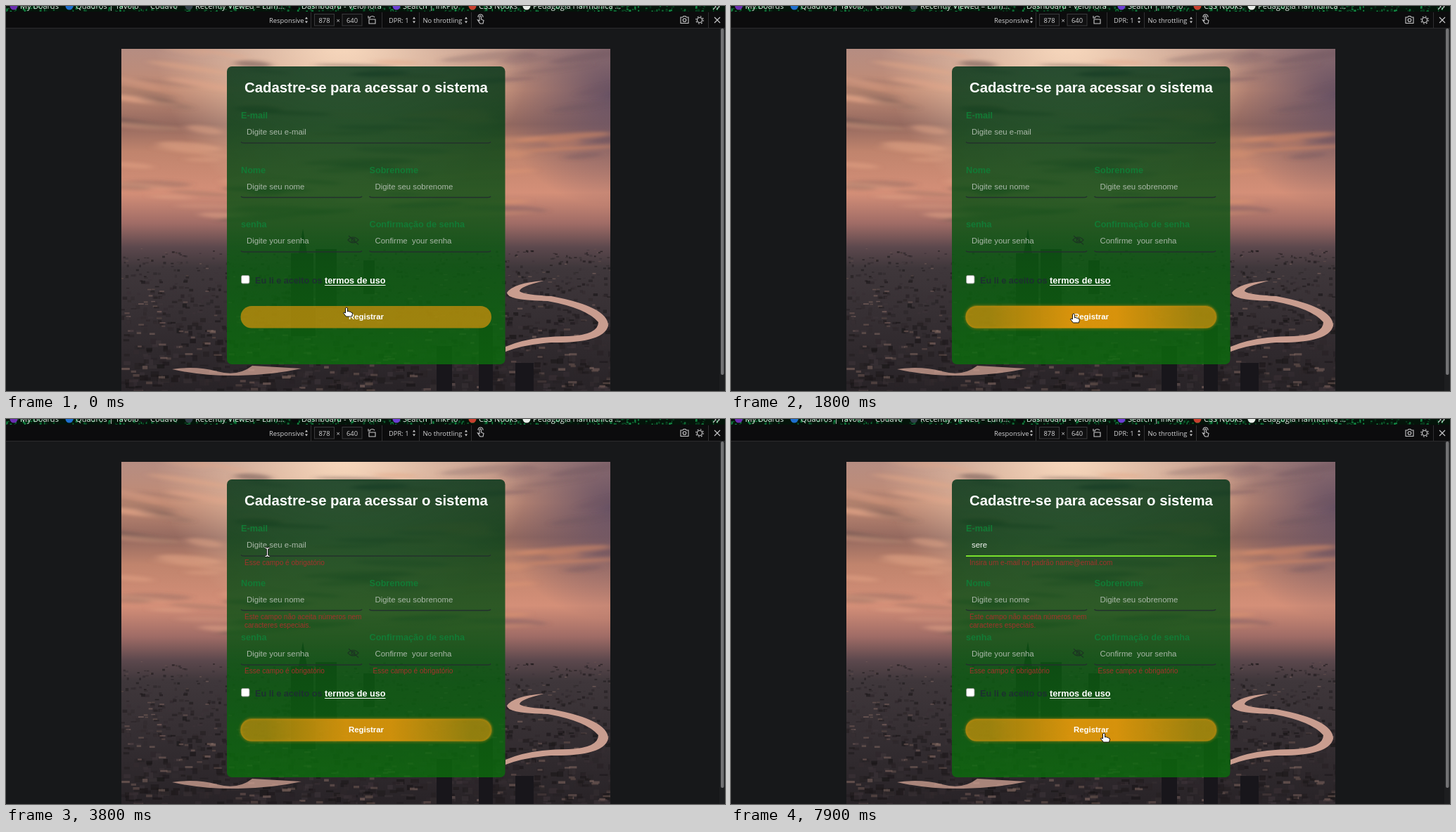
Write an HTML page that moves like this. It is 1022 px wide and 548 px high and loops after 8 s.

```html
<!DOCTYPE html>
<html lang="pt-BR">
<head>
<meta charset="utf-8">
<title>Cadastro</title>
<style>
html, body { margin: 0; width: 100%; height: 100%; overflow: hidden; background: #17181a; }
svg { display: block; width: 100%; height: 100%; }
text { font-family: "Liberation Sans", Arial, sans-serif; white-space: pre; }
.ui { font-family: "Open Sans", "Noto Sans", sans-serif; }
.label { font-weight: 700; font-size: 12.65px; fill: #127a35; }
.hint { font-size: 11.4px; fill: #a9b8a8; }
.err { font-size: 10.06px; fill: #a3322c; }
.line { fill: none; stroke: #23302d; stroke-width: 1.4; }
.icon { fill: none; stroke: #c9c9cb; stroke-width: 1.1; }
</style>
</head>
<body>
<svg viewBox="0 0 1022 548">
  <defs>
    <linearGradient id="sky" x2="0" y2="1">
      <stop offset="0" stop-color="#b58d82"/>
      <stop offset=".12" stop-color="#c28b74"/>
      <stop offset=".22" stop-color="#94695f"/>
      <stop offset=".3" stop-color="#c0846d"/>
      <stop offset=".42" stop-color="#d48f78"/>
      <stop offset=".51" stop-color="#a06c66"/>
      <stop offset=".58" stop-color="#5c484d"/>
      <stop offset=".64" stop-color="#3f373b"/>
      <stop offset="1" stop-color="#282327"/>
    </linearGradient>
    <radialGradient id="sun" gradientUnits="userSpaceOnUse" cx="480" cy="40" r="270">
      <stop offset="0" stop-color="#fbdcc0"/><stop offset="1" stop-color="#fbdcc0" stop-opacity="0"/>
    </radialGradient>
    <radialGradient id="dusk" gradientUnits="userSpaceOnUse" cx="860" cy="125" r="160">
      <stop offset="0" stop-color="#685264"/><stop offset="1" stop-color="#685264" stop-opacity="0"/>
    </radialGradient>
    <linearGradient id="glass" x2="0" y2="1">
      <stop offset="0" stop-color="#003216"/>
      <stop offset=".5" stop-color="#0c5214"/>
      <stop offset="1" stop-color="#0c6c0d"/>
    </linearGradient>
    <linearGradient id="fill">
      <stop class="edge" offset=".1" stop-color="#f29a0a"/>
      <stop class="mid" offset=".42" stop-color="#f29a0a"/>
      <stop class="mid" offset=".6" stop-color="#f29a0a"/>
      <stop class="edge" offset=".92" stop-color="#f29a0a"/>
    </linearGradient>
    <filter id="soft" x="-10%" y="-10%" width="120%" height="120%"><feGaussianBlur stdDeviation="6 2"/></filter>
    <filter id="glow" x="-10%" y="-60%" width="120%" height="220%"><feGaussianBlur stdDeviation="1.6"/></filter>
    <clipPath id="frame"><rect x="164" y="61" width="695" height="487"/></clipPath>
    <clipPath id="strip"><rect width="1022" height="8"/></clipPath>
  </defs>

  <rect width="1022" height="548" fill="#17181a"/>
  <g id="tabs" clip-path="url(#strip)"></g>
  <g id="tools"></g>

  <g clip-path="url(#frame)">
    <rect x="164" y="61" width="695" height="487" fill="url(#sky)"/>
    <rect x="164" y="61" width="695" height="280" fill="url(#sun)"/>
    <rect x="164" y="61" width="695" height="280" fill="url(#dusk)"/>
    <g id="clouds" filter="url(#soft)"></g>
    <g id="city"></g>
    <g fill="#c99d8f">
      <path d="M712 408Q722 394 765 391Q730 399 730 406Q736 411 775 413Q856 428 856 455Q850 480 775 479Q735 482 710 492V485Q745 470 800 470Q842 468 842 450Q825 430 770 420Q712 419 712 408Z"/>
      <path d="M236 517Q270 512 300 520T350 512L420 516Q380 525 330 526T236 517Z" opacity=".8"/>
    </g>
    <path d="M405 412V352H416L422 317L428 352H437V430H470V346H440V470H405ZM508 410V362H524V410ZM612 548V484H634V548ZM672 548V455H692V548ZM724 548V508H750V548Z" fill="#18161b"/>
  </g>

  <rect x="314" y="86" width="395.5" height="424" rx="7" fill="url(#glass)" fill-opacity=".83"/>
  <text x="512" y="123" text-anchor="middle" font-size="20.34" font-weight="700" fill="#fff">Cadastre-se para acessar o sistema</text>
  <g id="form"></g>
  <g class="icon" style="stroke:#1c2a24" opacity=".75">
    <path d="M486 333Q493.500 325 501 333Q493.500 341 486 333ZM487 327L501 339.500"/><circle cx="493.500" cy="333" r="2.400"/>
  </g>
  <rect x="334.500" y="383.500" width="11.500" height="11.500" rx="2" fill="#fff" stroke="#8b938b"/>
  <text x="354" y="395" class="label" style="fill:#1d3030">Eu li e aceito os</text>
  <text x="453" y="395" class="label" style="fill:#fff">termos de uso</text>
  <path d="M453 397.500H539.500" stroke="#fff" stroke-width="1.200"/>

  <rect id="halo" x="333.500" y="426.500" width="357" height="32.500" rx="16.200" fill="none" stroke="#e0900c" stroke-width="3" filter="url(#glow)"/>
  <rect x="333.500" y="427" width="356.500" height="31.500" rx="15.700" fill="url(#fill)"/>
  <rect id="ring" x="333.500" y="426.500" width="357" height="32" rx="16" fill="none" stroke="#b08a12" stroke-width="1.200"/>
  <text x="512" y="446" text-anchor="middle" font-size="11.400" font-weight="700" fill="#fff">Registrar</text>

  <g id="errors">
    <text id="mailErr" x="339" y="207.500" class="err"></text>
    <text x="339" y="285" class="err">Este campo não aceita números nem</text>
    <text x="339" y="297" class="err">caracteres especiais.</text>
    <text x="339" y="362" class="err">Esse campo é obrigatório</text>
    <text x="521.500" y="362" class="err">Esse campo é obrigatório</text>
  </g>
  <text id="mail" x="342" y="183" class="hint"></text>
  <rect id="caret" x="342" y="174" width="1" height="12" fill="#e8efe8"/>
  <path id="focus" stroke="#79e02c" stroke-width="1.800"/>
  <g id="menu"></g>

  <g id="cursor">
    <path id="hand" d="M-1.500 1Q0-1 1.500 1V6Q3.500 4.600 4.200 6.300Q6.200 5.600 6.700 7.300Q8.700 7 8.500 9L7.500 13H-.500L-4.500 8Q-4.500 6-1.500 8Z" fill="#fff" stroke="#111"/>
    <path id="arrow" d="M0 0V13L3.200 10.200L5.300 15L7.500 14L5.400 9.500H9.500Z" fill="#111" stroke="#fff"/>
    <g id="beam" fill="none">
      <path id="stem" d="M-3-6Q0-6 0-4V4Q0 6-3 6M3-6Q0-6 0-4M0 4Q0 6 3 6" stroke="#111" stroke-width="3"/>
      <use href="#stem" style="stroke:#fff"/>
    </g>
  </g>
</svg>
<script>
const $ = id => document.getElementById(id);
const put = (id, html) => { $(id).innerHTML = html; };
const rect = (x, y, w, h, fill, more = '') =>
  `<rect x="${x}" y="${y}" width="${w}" height="${h}" fill="${fill}" ${more}/>`;
const text = (x, y, cls, str, more = '') => `<text x="${x}" y="${y}" class="${cls}" ${more}>${str}</text>`;
const icon = d => `<path class="icon" d="${d}"/>`;
const repeat = (n, draw) => Array.from({ length: n }, (_, i) => draw(i / n)).join('');

let seed = 7;
const rnd = (a, b) => {
  seed = (seed * 16807) % 2147483647;
  return a + (b - a) * seed / 2147483647;
};

function drawTabs() {
  const tab = (x, fill, str) => `<circle cx="${x}" cy="0" r="5.5" fill="${fill}"/>`
    + text(x + 9, 4, 'ui', str, 'font-size="11.1" fill="#e4ebe6"');
  put('tabs', rect(0, 0, 1022, 8, '#04140a')
    + repeat(420, () => rect(rnd(0, 1022), rnd(-2, 7), rnd(1, 3), rnd(1, 4), `hsl(145 75% ${rnd(8, 32)}%)`))
    + tab(11, '#6b2fb0', 'My Boards') + tab(90, '#1f6fd0', 'Quadros | Tavolo')
    + tab(196, '#101214', 'Codavo') + tab(260, '#33404a', 'Recently Viewed – Lum…')
    + tab(411, '#08090a', 'Dashboard - VeloHora') + tab(555, '#6c3fd4', 'Search | inkPlo')
    + tab(663, '#c8402f', 'CSS Nooks') + tab(740, '#e8ece8', 'Pedagogia Harmônica …')
    + icon('M1005-3L1009 1L1005 5M1010-3L1014 1L1010 5'));
}

function drawTools() {
  const word = (x, str) => text(x, 23.5, 'ui', str, 'font-size="9.4" fill="#d2d2d4"');
  const spin = x => `<path d="M${x - 2} 18.5l2-3l2 3zm0 3l2 3l2-3z" fill="#c9c9cb"/>`;
  const bar = x => rect(x, 9, 1, 22, '#303032');
  const box = (x, str) => rect(x, 11.5, 28, 16.5, '#101011', 'stroke="#3a3a3c"') + word(x + 6, str);
  const ring = (x, r, more = '') => `<circle class="icon" cx="${x}" cy="20" r="${r}" ${more}/>`;
  put('tools', rect(0, 8, 1022, 23, '#0c0c0d') + rect(0, 31, 1022, 1, '#2b2b2d')
    + [433, 534, 587, 661, 998].map(bar).join('')
    + word(374, 'Responsive') + spin(427) + box(438.5, '878') + word(469.5, '×') + box(478, '640')
    + word(544, 'DPR: 1') + spin(580) + word(592.5, 'No throttling') + spin(654)
    + icon('M516 19H525V25H516ZM517 16Q521 13 524 16M515 14V17H518')
    + icon('M673 24L670.5 20L673 21V15Q674.5 13 675.5 15V19L679 20.5L678 25H674ZM671 16Q671 12 674.5 12T678 16')
    + icon('M959 16H962L963 14.5H966L967 16H970V24.5H959Z') + ring(964.5, 2.3)
    + ring(986, 3.5) + ring(986, 5.3, 'stroke-dasharray="2 2.16"')
    + icon('M1007 16L1015 24M1015 16L1007 24')
    + rect(1014, 32, 8, 516, '#1d1e20') + rect(1016, 32, 4.5, 493, '#727274', 'rx="2"'));
}

function drawPhoto() {
  // streaks fan out from the bright centre: warm on the left, mauve on the right
  put('clouds', repeat(90, k => {
    const x = rnd(150, 870), y = 64 + 240 * k, side = (x - 512) / 350;
    const dark = rnd(0, 1) < .5;
    const fill = dark ? `hsl(${side > 0 ? 335 : 8} 14% 38%)` : `hsl(20 65% ${72 - 10 * Math.max(0, side)}%)`;
    return `<ellipse rx="${rnd(25, 75)}" ry="${rnd(2, 6)}" fill="${fill}" opacity="${rnd(.2, .55)}"
      transform="translate(${x} ${y}) rotate(${-14 * side * (1 - k) + rnd(-4, 4)})"/>`;
  }));

  // roofs grow towards the viewer, with a few lit faces
  put('city', repeat(1800, k => {
    const lit = rnd(0, 1) > .85, size = 1 + 2.5 * k;
    const fill = lit ? `hsl(12 14% ${rnd(32, 46)}%)` : `hsl(330 8% ${rnd(8, 23)}%)`;
    return rect(rnd(160, 859), 348 + 200 * k + rnd(-4, 4), rnd(2, 4) * size, rnd(.8, lit ? 1.2 : 3) * size, fill, 'opacity=".6"');
  }));
}

function drawForm() {
  const field = (x, y, w, name, hint) =>
    text(x, y, 'label', name) + (hint ? text(x + 8, y + 23, 'hint', hint) : '')
    + `<path class="line" d="M${x} ${y + 33.5}q1 1.5 4 1.5h${w - 8}q3 0 4-1.5"/>`;
  put('form', field(334, 160, 355, 'E-mail')
    + field(334, 237.5, 172, 'Nome', 'Digite seu nome') + field(516.5, 237.5, 172.5, 'Sobrenome', 'Digite seu sobrenome')
    + field(334, 315, 172, 'senha', 'Digite your senha')
    + field(516.5, 315, 172.5, 'Confirmação de senha', 'Confirme\u00a0 your senha'));

  const user = 'serefilostivia';
  put('menu', rect(334, 196, 356, 67, '#343234') + rect(681.5, 200, 4.5, 63, '#8c8a8a', 'rx="2"')
    + ['593@vilto', '593@vilto.com', '1@vilto.com', '593@vil'].map((end, i) =>
      text(339, 210 + 16 * i, 'ui', user + end, 'font-size="12.3" fill="#f2f2f2"')).join(''));
}

const show = (id, on) => $(id).setAttribute('display', on ? 'inline' : 'none');
const set = (id, key, val) => $(id).setAttribute(key, val);
const setAll = (cls, key, val) => document.querySelectorAll(cls).forEach(e => e.setAttribute(key, val));
const mix = (a, b, k) => a + (b - a) * k;
const span = (t, from, to) => Math.min(1, Math.max(0, (t - from) / (to - from)));
const smooth = k => k * k * (3 - 2 * k);

// two dips below the button, up to the e-mail field, then back down
function pointer(t) {
  const s = Math.min(t, 1900);
  const up = 1 - (1 - span(t, 3000, 3800)) ** 3, back = smooth(span(t, 6950, 7850));
  const x = 489 - 5 * Math.cos(Math.PI * s / 1100);
  const y = mix(429, 437, span(s, 0, 1100)) + 82 * Math.sin(Math.PI * s / 950) ** 4;
  return [mix(mix(x, 371.5, up), 530, back), mix(mix(y, 189.5, up), 447, back)];
}

// strength of the button's hover effect, 0 to 1
function hoverAt(t) {
  if (t < 1900) return .41 - .2 * Math.sin(Math.PI * t / 950) ** 4;
  if (t < 3000) return mix(.41, 1, span(t, 1800, 2100));
  if (t < 7000) return 1 - span(t, 3000, 4100) ** 2;
  return .42 * span(t, 7400, 7900);
}

function render(t) {
  const h = hoverAt(t), spread = span(t, 0, 900);
  setAll('.edge', 'stop-opacity', 1 - .92 * h);
  setAll('.mid', 'stop-opacity', 1 - .92 * mix(h, h ** 2.3, spread));
  set('halo', 'opacity', h * spread * .7);
  set('ring', 'opacity', h * spread * .8);

  show('errors', t >= 2400);
  $('mailErr').textContent = t < 7000 ? 'Esse campo é obrigatório' : 'Insira um e-mail no padrão name@email.com';

  const typed = 'sere'.slice(0, [5500, 5900, 6000, 6600].filter(k => t >= k).length);
  $('mail').textContent = typed || 'Digite seu e-mail';
  $('mail').style.fill = typed ? '#f2f5f2' : '#a9b8a8';
  show('caret', t >= 4300 && t < 5500);
  const half = 178 * span(t, 4200, 4800);
  show('focus', half > 0);
  set('focus', 'd', `M${512 - half} 195H${512 + half}`);
  show('menu', t >= 5600 && t < 7000);

  const [x, y] = pointer(t);
  const onButton = y > 426 && y < 459, overText = t > 2900 && t < 5600;
  set('cursor', 'transform', `translate(${x} ${y})`);
  show('hand', onButton);
  show('beam', !onButton && overText);
  show('arrow', !onButton && !overText);
}

drawTabs();
drawTools();
drawPhoto();
drawForm();
$('beam').innerHTML += `<path d="${$('stem').getAttribute('d')}" stroke="#fff" stroke-width="1.2"/>`;
$('beam').querySelector('use').remove();

const start = performance.now();
function tick() {
  const t = (performance.now() - start) % 8000;
  render(Math.floor(t / 100) * 100);
  requestAnimationFrame(tick);
}
tick();
</script>
</body>
</html>
```
